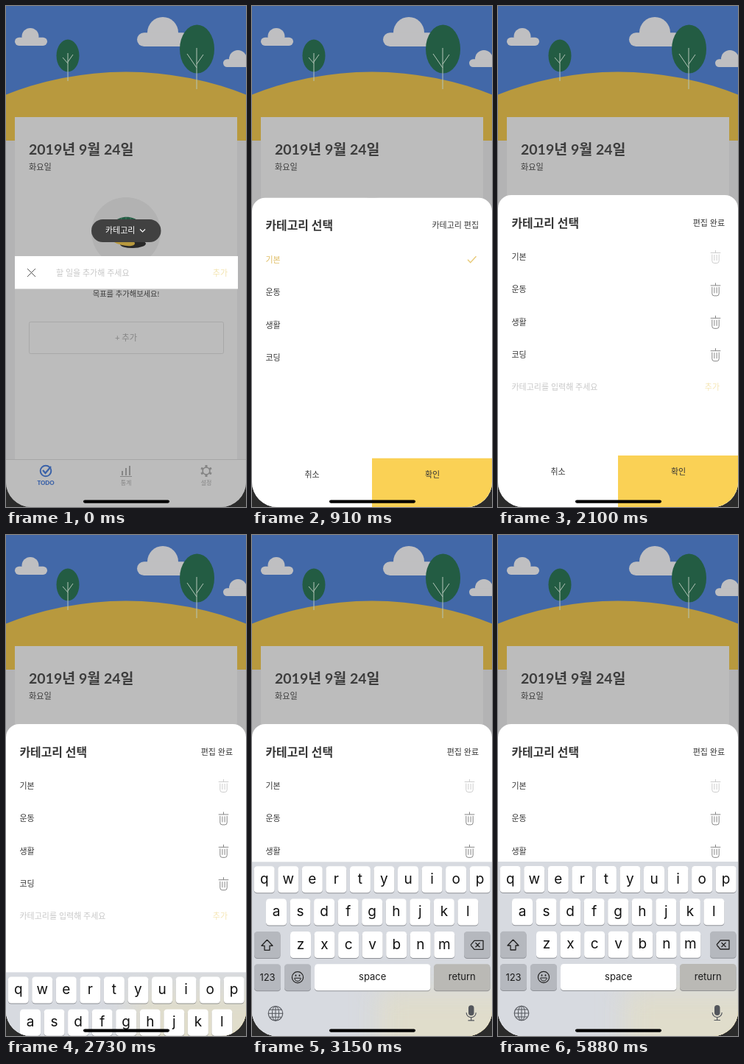
These frames come from a looping animation (326x681 px, 6090 ms). An HTML page with a canvas:

```html
<!DOCTYPE html>
<html lang="ko">
<head>
<meta charset="utf-8">
<title>할 일 카테고리</title>
<style>
html, body { margin: 0; width: 100%; height: 100%; overflow: hidden; background: #2b2b2b; }
canvas { display: block; width: 326px; height: 681px; }
</style>
</head>
<body>
<canvas id="stage"></canvas>
<script>
const W = 326, H = 681, LOOP = 6090, STEP = 70;
const KO = 'Lato, "Noto Sans CJK KR", "Noto Sans CJK", sans-serif';
const KEY = 'Inter, Roboto, sans-serif';
const INK = '#363636', GOLD = '#fad155', DIM_INK = '#3d3d3d';
const GREEN = '#235c43', DIM_GOLD = '#b8993e';

const canvas = document.getElementById('stage');
const dpr = window.devicePixelRatio || 1;
canvas.width = W * dpr;
canvas.height = H * dpr;
const c = canvas.getContext('2d');

const clamp = v => Math.max(0, Math.min(1, v));
const ramp = (t, from, to) => clamp((t - from) / (to - from));

// Critically damped spring: share of the distance still to go.
function remaining(t, start) {
  const x = Math.max(0, t - start) * 0.01826;
  return (1 + x) * Math.exp(-x);
}

function rect(x, y, w, h, color) {
  c.fillStyle = color;
  c.fillRect(x, y, w, h);
}

function round(x, y, w, h, r, color) {
  c.beginPath();
  c.roundRect(x, y, w, h, r);
  c.fillStyle = color;
  c.fill();
}

function oval(x, y, rx, ry, color, angle = 0) {
  c.beginPath();
  c.ellipse(x, y, rx, ry, angle, 0, Math.PI * 2);
  c.fillStyle = color;
  c.fill();
}

function ring(x, y, rx, ry, color, width) {
  c.beginPath();
  c.ellipse(x, y, rx, ry, 0, 0, Math.PI * 2);
  c.strokeStyle = color;
  c.lineWidth = width;
  c.stroke();
}

// Each path is a flat list of x, y pairs.
function lines(color, width, ...paths) {
  c.strokeStyle = color;
  c.lineWidth = width;
  c.beginPath();
  for (const p of paths) {
    c.moveTo(p[0], p[1]);
    for (let i = 2; i < p.length; i += 2) c.lineTo(p[i], p[i + 1]);
  }
  c.stroke();
}

function text(s, x, cy, size, color, align = 'left', weight = 400, family = KO) {
  c.font = `${weight} ${size}px ${family}`;
  c.textAlign = align;
  c.fillStyle = color;
  c.fillText(s, x, cy + size * 0.37);
}

// A pill-shaped base with one round bump that stops at the flat bottom.
function cloud(x, y, w, h, bumpX, bumpR) {
  const base = h * 0.47, color = '#bfbfc1';
  c.save();
  c.beginPath();
  c.rect(x, y, w, h - base / 2);
  c.clip();
  oval(x + bumpX, y + bumpR, bumpR, bumpR, color);
  c.restore();
  round(x, y + h - base, w, base, base / 2, color);
}

function drawScenery() {
  rect(0, 0, W, 183, '#4268a8');
  cloud(12, 30, 44, 24, 21, 11.5);
  cloud(178, 15, 72, 40, 35, 21);
  cloud(295, 60, 46, 23, 20, 12);
  c.save();
  c.beginPath();
  c.rect(0, 0, W, 183);
  c.clip();
  oval(163, 533.5, 444, 444, DIM_GOLD);
  c.restore();
  oval(84, 67.5, 15.5, 22, GREEN);
  oval(259.5, 58.5, 23.5, 33, GREEN);
  lines('#b5c6b9', 1,
    [84, 64, 84, 102], [77, 70, 84, 78], [91, 66, 84, 76],
    [259, 57, 259, 113], [246, 65, 259, 84], [268, 66, 259, 79]);
}

function drawDome() {
  oval(163, 307, 47, 47, '#b2b2b2');
  oval(172.5, 323.5, 17.5, 5.5, '#292929', -0.03);
  oval(158, 319, 17.5, 6, DIM_GOLD, 0.25);
  c.save();
  c.beginPath();
  c.moveTo(137.5, 314);
  c.bezierCurveTo(138, 278, 189, 278, 189.5, 313);
  c.bezierCurveTo(182, 322, 152, 324, 137.5, 314);
  c.fillStyle = GREEN;
  c.fill();
  c.clip();
  for (let i = -3; i <= 3; i++) {
    const x = 163 + i * 8;
    lines('#5b8b72', 0.6, [163 + i * 6, 285, x, 322], [136, 303 + i * 6, 191, 303 + i * 6]);
  }
  c.restore();
}

function drawTabs() {
  rect(0, 616, W, 65, '#bcbcbc');
  rect(0, 616, W, 1, '#a6a6a6');
  const blue = '#3b62a8', gray = '#858585';
  ring(54, 632, 7.3, 7.3, blue, 2);
  lines(blue, 2.2, [50, 631, 53.5, 635, 61, 626]);
  text('TODO', 54, 648.3, 7.8, blue, 'center', 900);
  lines(gray, 2, [158, 638, 158, 632], [163, 638, 163, 628], [168, 638, 168, 625]);
  lines(gray, 1, [155, 639.5, 171, 639.5]);
  text('통계', 163, 648.3, 8, gray, 'center', 500);
  for (let i = 0; i < 6; i++) {
    const a = Math.PI * (i / 3 + 1 / 6), dx = Math.cos(a), dy = Math.sin(a);
    lines(gray, 3, [272 + dx * 5, 632 + dy * 5, 272 + dx * 8, 632 + dy * 8]);
  }
  ring(272, 632, 4.8, 4.8, gray, 1.7);
  text('설정', 272, 648.3, 8, gray, 'center', 500);
}

function drawPage() {
  rect(0, 0, W, H, '#b3b3b4');
  drawScenery();
  rect(12, 151, 302, 466, '#bcbcbc');
  text('2019년 9월 24일', 31, 194.7, 19.5, DIM_INK, 'left', 700);
  text('화요일', 31, 218.5, 11.2, DIM_INK);
  drawDome();
  text('등록된 내용이 없습니다.', 163, 375.5, 10.3, DIM_INK, 'center');
  text('목표를 추가해보세요!', 163, 390.7, 10.3, DIM_INK, 'center');
  c.strokeStyle = '#a8a8a8';
  c.lineWidth = 1;
  c.beginPath();
  c.roundRect(31.5, 429.5, 264, 43, 2);
  c.stroke();
  text('+ 추가', 163, 451, 11.3, '#858585', 'center');
  drawTabs();
}

function drawEntry(alpha) {
  if (!alpha) return;
  c.save();
  c.globalAlpha = alpha;
  round(116, 290, 94.5, 31, 15.5, '#414141');
  text('카테고리', 135, 305.3, 11, '#fff', 'left', 500);
  lines('#fff', 1.1, [182, 303.5, 185.5, 307, 189, 303.5]);
  rect(12, 340, 303, 44.5, '#fff');
  lines('#555', 1, [29, 357, 40, 368], [40, 357, 29, 368]);
  text('할 일을 추가해 주세요', 68, 362.5, 11, '#c6c6c6');
  text('추가', 301, 362.5, 11, '#f3e4ae', 'right');
  c.restore();
}

function trash(y, color) {
  const x = 295.5, half = 4.7, lid = y - 5.5, floor = y + 8.5;
  lines(color, 1, [x - 6.8, lid, x + 6.8, lid], [x, lid - 3.5, x, lid],
    [x - 1.6, lid + 2.5, x - 1.6, y + 5], [x + 1.6, lid + 2.5, x + 1.6, y + 5]);
  c.beginPath();
  c.moveTo(x - half, lid + 2);
  c.arcTo(x - half, floor, x, floor, 3);
  c.arcTo(x + half, floor, x + half, lid, 3);
  c.lineTo(x + half, lid + 2);
  c.stroke();
}

function drawSheet(top, editing, linkAlpha) {
  if (top >= H) return;
  round(0, top, W, H, [18, 18, 0, 0], '#fff');
  text('카테고리 선택', 18.5, top + 37.8, 15.9, INK, 'left', 700);
  c.globalAlpha = linkAlpha;
  text(editing ? '편집 완료' : '카테고리 편집', 308, top + 37.5, 11, INK, 'right');
  c.globalAlpha = 1;
  ['기본', '운동', '생활', '코딩'].forEach((name, i) => {
    const y = top + 84 + i * 44.4;
    const chosen = i === 0 && !editing;
    text(name, 18.5, y, 11, chosen ? '#dfbd63' : INK);
    if (editing) trash(y, i ? '#858585' : '#cdcdcd');
    else if (chosen) lines('#e8ca78', 1.4, [293, y, 296.7, y + 4, 304.5, y - 4.5]);
  });
  if (editing) {
    text('카테고리를 입력해 주세요', 18.5, top + 261, 11, '#c8c8c8');
    text('추가', 301, top + 261, 11, '#f5e6b5', 'right');
  }
  rect(163, top + 354, 163, H, GOLD);
  text('취소', 81.5, top + 376, 11, INK, 'center');
  text('확인', 245, top + 376, 11, INK, 'center');
}

function keycap(x, y, w, color = '#fff') {
  round(x, y + 1, w, 36, 4.3, 'rgba(70,72,78,.5)');
  round(x, y, w, 36, 4.3, color);
}

function letters(row, x, y) {
  [...row].forEach((ch, i) => {
    const left = x + i * 32.55;
    keycap(left, y, 28);
    text(ch, left + 14, y + 16.5, 19, '#111', 'center', 400, KEY);
  });
}

function drawKeyboardIcons(top) {
  const ink = '#222', y3 = top + 113, y4 = top + 157;
  c.lineJoin = 'round';
  lines(ink, 1.3, [20.5, y3 - 7, 13, y3 + 1, 17, y3 + 1, 17, y3 + 7, 24, y3 + 7, 24, y3 + 1, 28, y3 + 1, 20.5, y3 - 7]);
  lines(ink, 1.3, [297, y3, 302, y3 - 6, 314, y3 - 6, 314, y3 + 6, 302, y3 + 6, 297, y3],
    [303.5, y3 - 3, 309.5, y3 + 3], [309.5, y3 - 3, 303.5, y3 + 3]);
  c.lineJoin = 'miter';

  ring(62, y4, 7.6, 7.6, ink, 1.2);
  oval(59.5, y4 - 2.5, 0.9, 1.3, ink);
  oval(64.5, y4 - 2.5, 0.9, 1.3, ink);
  c.beginPath();
  c.arc(62, y4 + 1, 4.2, 0, Math.PI);
  c.closePath();
  c.lineWidth = 1;
  c.stroke();

  const y = top + 206, gray = '#53565c';
  ring(32, y, 9.8, 9.8, gray, 1.1);
  ring(32, y, 4.6, 9.8, gray, 1);
  lines(gray, 1, [32, y - 10, 32, y + 10], [22, y, 42, y], [24, y - 5, 40, y - 5], [24, y + 5, 40, y + 5]);

  round(294, y - 11, 7.5, 14, 3.75, gray);
  c.beginPath();
  c.arc(297.7, y - 1, 6.5, 0, Math.PI);
  c.lineWidth = 1.2;
  c.stroke();
  lines(gray, 1.2, [297.7, y + 5.5, 297.7, y + 9.5], [293.5, y + 9.5, 302, y + 9.5]);
}

function drawKeyboard(top) {
  if (top >= H) return;
  rect(0, top, W, H, '#d7dae0');
  // The yellow button glows softly through the panel.
  c.save();
  c.beginPath();
  c.rect(0, top, W, H);
  c.clip();
  c.filter = 'blur(18px)';
  rect(172, 618, 220, 140, 'rgba(238,224,172,.4)');
  c.restore();

  const dark = '#b5b8be';
  letters('qwertyuiop', 2.7, top + 6);
  letters('asdfghjkl', 19, top + 50.3);
  letters('zxcvbnm', 52, top + 94.8);
  keycap(3, top + 94.8, 35.5, dark);
  keycap(288, top + 94.8, 35.5, dark);
  keycap(3, top + 139, 36, dark);
  keycap(44, top + 139, 36, dark);
  keycap(85, top + 139, 157.5);
  keycap(247, top + 139, 76.5, '#bab9b5');
  text('123', 21, top + 157, 13, '#1c1c1c', 'center', 400, KEY);
  text('space', 163.7, top + 156, 13, '#1c1c1c', 'center', 400, KEY);
  text('return', 285.3, top + 156, 13, '#1c1c1c', 'center', 400, KEY);
  drawKeyboardIcons(top);
}

function draw(t) {
  c.setTransform(dpr, 0, 0, dpr, 0, 0);
  rect(0, 0, W, H, '#2b2b2b');
  c.save();
  c.beginPath();
  c.roundRect(0, 0, W, H, [0, 0, 34, 34]);
  c.clip();

  const editing = t >= 1540;
  const press = editing ? 1 - ramp(t, 1540, 1750) : ramp(t, 1300, 1450);
  drawPage();
  drawEntry(1 - ramp(t, 270, 500));
  drawSheet(257 + 424 * remaining(t, 538.2), editing, 1 - 0.8 * press);
  drawKeyboard(444 + 237 * remaining(t, 2660));
  round(105, 671.5, 117, 4.2, 2.1, '#000');
  c.restore();
}

const begin = performance.now();
function tick() {
  const t = (performance.now() - begin) % LOOP;
  draw(Math.floor(t / STEP) * STEP);
  requestAnimationFrame(tick);
}
tick();
</script>
</body>
</html>
```
